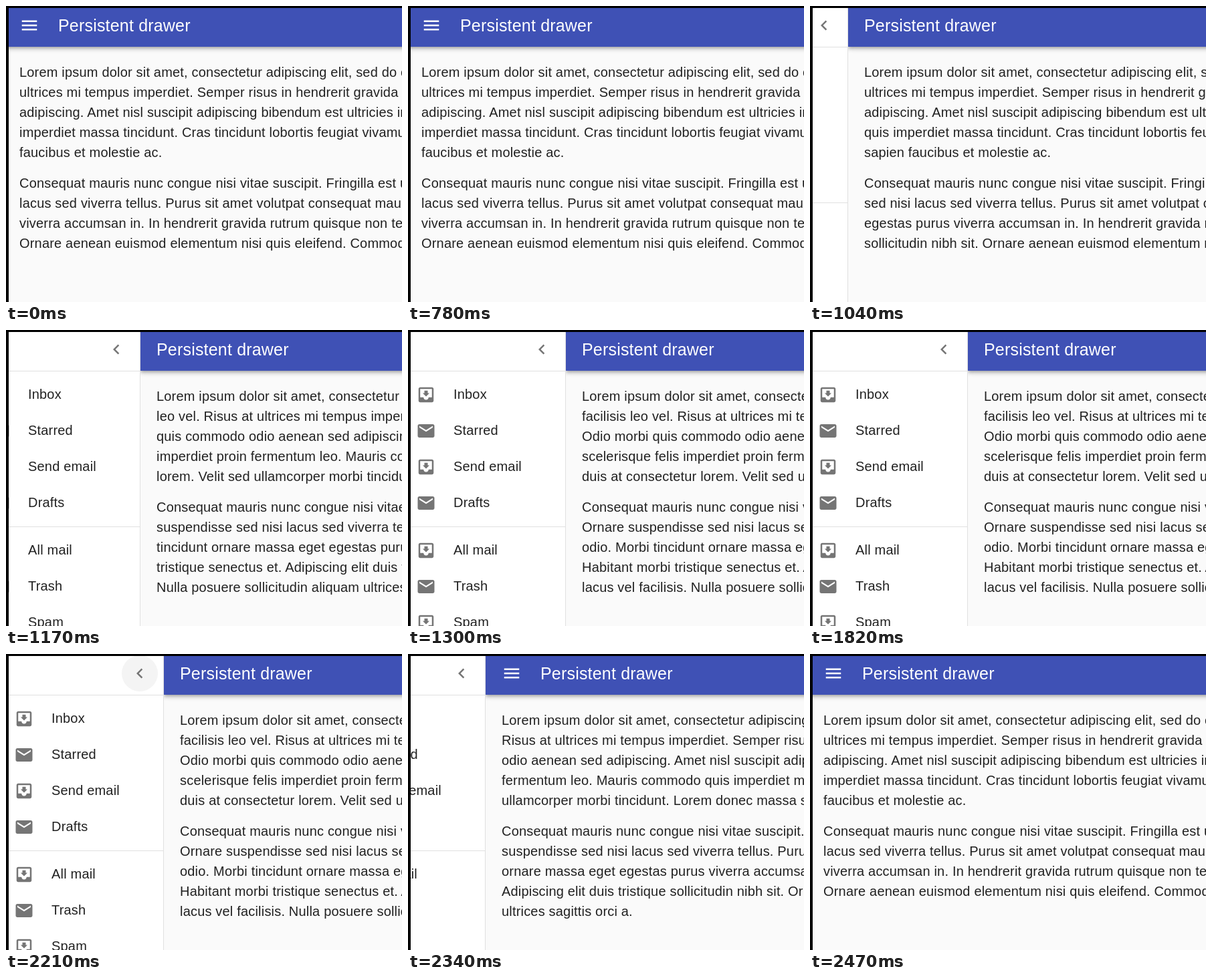
Write an HTML page that moves like this. It is 592x443 px and loops after 3250 ms.

```html
<!DOCTYPE html>
<html lang="en">
<head>
<meta charset="utf-8">
<title>Persistent drawer</title>
<style>
  html, body { margin: 0; width: 100%; height: 100%; overflow: hidden; }
  body {
    position: relative;
    background: #fafafa;
    color: rgba(0, 0, 0, .87);
    font: 20px/30px "Liberation Sans", Arial, sans-serif;
    letter-spacing: .00938em;
  }
  body *, .edge { position: absolute; }
  svg { width: 30px; height: 30px; fill: #757575; }
  main p { position: static; margin: 0 0 16px; }
  main { top: 84px; }
  #bar {
    top: 3px; width: 700px; height: 58px;
    background: #3f51b5; color: #fff;
    box-shadow: 0 2px 4px -1px rgba(0, 0, 0, .2), 0 4px 5px rgba(0, 0, 0, .14), 0 1px 10px rgba(0, 0, 0, .12);
  }
  #bar svg { left: 24px; top: 11px; fill: #fff; }
  #title { top: 6px; font-size: 25px; line-height: 40px; letter-spacing: .0075em; white-space: nowrap; }
  #drawer { top: 0; width: 239px; height: 443px; background: #fff; border-right: 1px solid #e0e0e0; }
  #drawer hr { left: 0; width: 239px; height: 1px; margin: 0; border: 0; background: #e0e0e0; }
  #drawer svg { left: 16px; }
  #drawer span { left: 72px; white-space: nowrap; }
  #back { left: 177px; top: 2px; width: 54px; height: 54px; border-radius: 50%; }
  #drawer #back svg { left: 12px; top: 12px; }
  .edge { left: 0; top: 0; background: #000; }
</style>
</head>
<body>
<main id="main">
  <p>Lorem ipsum dolor sit amet, consectetur adipiscing elit, sed do eiusmod tempor incididunt ut labore et dolore magna aliqua. Rhoncus dolor purus non enim praesent elementum facilisis leo vel. Risus at ultrices mi tempus imperdiet. Semper risus in hendrerit gravida rutrum quisque non tellus. Convallis convallis tellus id interdum velit laoreet id donec ultrices. Odio morbi quis commodo odio aenean sed adipiscing. Amet nisl suscipit adipiscing bibendum est ultricies integer quis. Cursus euismod quis viverra nibh cras. Metus vulputate eu scelerisque felis imperdiet proin fermentum leo. Mauris commodo quis imperdiet massa tincidunt. Cras tincidunt lobortis feugiat vivamus at augue. At augue eget arcu dictum varius duis at consectetur lorem. Velit sed ullamcorper morbi tincidunt. Lorem donec massa sapien faucibus et molestie ac.</p>
  <p>Consequat mauris nunc congue nisi vitae suscipit. Fringilla est ullamcorper eget nulla facilisi etiam dignissim diam. Pulvinar elementum integer enim neque volutpat ac tincidunt. Ornare suspendisse sed nisi lacus sed viverra tellus. Purus sit amet volutpat consequat mauris. Elementum eu facilisis sed odio morbi. Euismod lacinia at quis risus sed vulputate odio. Morbi tincidunt ornare massa eget egestas purus viverra accumsan in. In hendrerit gravida rutrum quisque non tellus orci ac. Pellentesque nec nam aliquam sem et tortor. Habitant morbi tristique senectus et. Adipiscing elit duis tristique sollicitudin nibh sit. Ornare aenean euismod elementum nisi quis eleifend. Commodo viverra maecenas accumsan lacus vel facilisis. Nulla posuere sollicitudin aliquam ultrices sagittis orci a.</p>
</main>
<div id="bar">
  <svg id="menu" viewBox="0 0 24 24"><path d="M3 18h18v-2H3v2zm0-5h18v-2H3v2zm0-7v2h18V6H3z"/></svg>
  <div id="title">Persistent drawer</div>
</div>
<div id="drawer">
  <div id="back"><svg viewBox="0 0 24 24"><path d="M15.41 7.41L14 6l-6 6 6 6 1.41-1.41L10.83 12z"/></svg></div>
  <hr style="top:61px">
  <hr style="top:294px">
</div>
<div class="edge" style="width:592px;height:3px"></div>
<div class="edge" style="width:4px;height:443px"></div>
<script>
const $ = id => document.getElementById(id);
const LOOP = 3250, STEP = 130, WIDTH = 240;
const icons = [
  'M19 3H4.99c-1.11 0-1.98.9-1.98 2L3 19c0 1.1.88 2 1.99 2H19c1.1 0 2-.9 2-2V5c0-1.1-.9-2-2-2zm0 12h-4c0 1.66-1.35 3-3 3s-3-1.34-3-3H4.99V5H19v10zm-3-5h-2V7h-4v3H8l4 4 4-4z',
  'M20 4H4c-1.1 0-1.99.9-1.99 2L2 18c0 1.1.9 2 2 2h16c1.1 0 2-.9 2-2V6c0-1.1-.9-2-2-2zm0 4l-8 5-8-5V6l8 5 8-5v2z'
];

['Inbox', 'Starred', 'Send email', 'Drafts', 'All mail', 'Trash', 'Spam'].forEach((label, i) => {
  const y = 81 + 54 * i + (i > 3 ? 17 : 0);
  $('drawer').insertAdjacentHTML('beforeend',
    `<svg viewBox="0 0 24 24" style="top:${y + 1}px"><path d="${icons[i % 4 % 2]}"/></svg>
     <span style="top:${y}px">${label}</span>`);
});

// cubic-bezier(x1, 0, x2, 1)
function ease(x1, x2, p) {
  p = Math.min(1, Math.max(0, p));
  let lo = 0, hi = 1, s = .5;
  for (let i = 0; i < 24; i++) {
    s = (lo + hi) / 2;
    const x = 3 * (1 - s) * (1 - s) * s * x1 + 3 * (1 - s) * s * s * x2 + s * s * s;
    if (x < p) lo = s; else hi = s;
  }
  return s * s * (3 - 2 * s);
}

function draw(now) {
  // the picture advances in steps of 130 ms
  const t = Math.floor(now % LOOP / STEP) * STEP;
  const shown = ease(0, .2, (t - 1017) / 292) - ease(.4, .6, (t - 2210) / 260);
  const x = Math.round(WIDTH * shown);
  const open = t >= 1040 && t < 2340;

  $('main').style.left = 20 + x + 'px';
  $('main').style.width = 1876 - x + 'px';
  $('bar').style.left = x - 4 + 'px';
  $('drawer').style.left = x - 4 - WIDTH + 'px';
  $('menu').style.display = open ? 'none' : 'block';
  $('title').style.left = (open ? 24 : 82) + 'px';
  $('back').style.background = t === 2210 ? '#f4f4f4' : 'none';
}

const start = performance.now();
function tick() {
  draw(performance.now() - start);
  requestAnimationFrame(tick);
}
tick();
</script>
</body>
</html>
```
